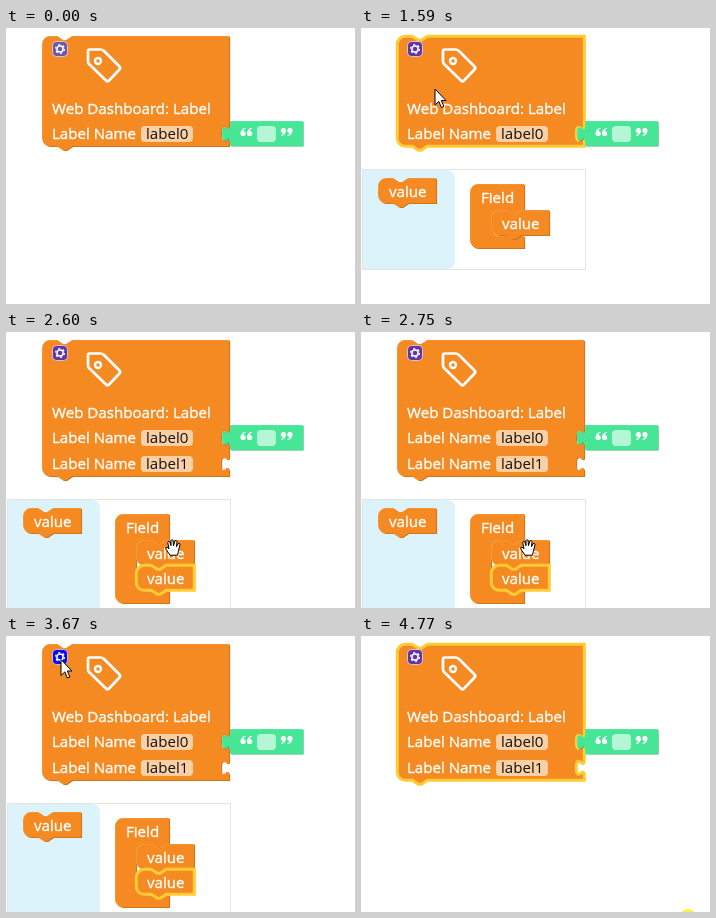
These frames come from a looping animation (349 by 276 pixels, 4.85 s). An HTML page:

```html
<!DOCTYPE html>
<html lang="en">
<head>
<meta charset="utf-8">
<title>Adding a label row</title>
<style>
  html, body { margin: 0; width: 100%; height: 100%; overflow: hidden; background: #fff; }
  svg { display: block; width: 349px; height: 276px; }
  text { font: 15.1px "Open Sans", "Noto Sans", sans-serif; fill: #fff; stroke: #fff; stroke-width: .35; }
  .field { fill: #111; stroke: none; }
  .selected .edge { display: none; }
  .selected > .face { stroke: #fc3; stroke-width: 3; }
  .dragging .face { fill-opacity: .8; stroke-opacity: .75; }
  .dragging text { opacity: .85; }
</style>
</head>
<body>
<svg id="stage" viewBox="0 0 349 276"></svg>
<script>
const LOOP = 4850;
const ORANGE = ['#f58a22', '#c36e1b', '#f9b066'];
const GREEN = ['#47e697', '#39b879', '#7eeeb6'];

// Block outlines, relative to each block's top left corner
const NOTCH = 'l6 4h3l6-4', BUMP = 'l-6 4h-3l-6-4';
const SOCKET = 'v5c0 10-8-8-8 7.5s8-2.5 8 7.5';
const top_ = w => `M0 8a8 8 0 0 1 8-8h7${NOTCH}H${w}`;
const bottom = h => `V${h}H30${BUMP}H8a8 8 0 0 1-8-8z`;
const labelPath = rows => top_(187) + 'v85' + Array(rows).fill(SOCKET).join('v6') + bottom(84 + 26 * rows);
const valuePath = top_(58) + bottom(25);
const fieldPath = n => `M0 8a8 8 0 0 1 8-8H54V26H51${BUMP}H29a8 8 0 0 0-8 8V${19 + 25 * n}` +
  `a8 8 0 0 0 8 8H54V${39 + 25 * n}H8a8 8 0 0 1-8-8z`;
const textBlockPath = 'M0 0H72.5V24.5H0V20c0-10-8 8-8-7.5s8 2.5 8-7.5z';

const text = (x, y, s, cls = '') => `<text x="${x}" y="${y}" class="${cls}">${s}</text>`;
const group = (id, x, y, body) => `<g id="${id}" transform="translate(${x} ${y})">${body}</g>`;
const block = (id, x, y, d, [face, dark, light], body = '') => group(id, x, y,
  `<path class="edge" d="${d}" fill="${dark}" transform="translate(.1 .1)"/>
   <path class="edge" d="${d}" fill="${light}" transform="translate(-1 -1)"/>
   <path class="face" d="${d}" fill="${face}" transform="translate(-.7 -.7)"/>${body}`);
const value = (id, x, y) => block(id, x, y, valuePath, ORANGE, text(10, 18, 'value'));
const row = i => text(9, 102 + 26 * i, 'Label Name') +
  `<rect x="98" y="${89 + 26 * i}" width="52" height="16" rx="4" fill="#fbd0a5"/>` +
  text(103, 102 + 26 * i, 'label' + i, 'field');

const tag = `<g fill="none" stroke="#fff" stroke-width="2.700" stroke-linejoin="round" transform="translate(-.5 -.5)">
  <path d="M47 13H58Q60 13 61.500 14.500L77 30Q78.500 31.500 77 33L66.500 44Q65 45.500 63.500 44L47 28Q45.500 26.500 45.500 25V15Q45.500 13 47 13z"/>
  <circle cx="55.500" cy="24.500" r="3" stroke-width="2.400"/></g>`;
const labelBlock = rows => block('label' + rows, 37, 9, labelPath(rows), ORANGE,
  tag + text(9, 77, 'Web Dashboard: Label') + row(0) + (rows > 1 ? row(1) : ''));

const gear = `<rect id="gearBox" x="-7.500" y="-7.500" width="15" height="15" rx="4" stroke="#fff" stroke-opacity=".6"/>
  <circle r="3.100" fill="none" stroke="#fff" stroke-width="1.500"/>
  <circle r="4.400" fill="none" stroke="#fff" stroke-width="1.300" stroke-dasharray="2 2.608"/>`;
const mark = `M5 1C2 1 0 4 0 6.500a2.600 2.600 0 1 0 2.600-2.600Q3.200 2.300 5 1.800z
  M11.500 1C8.500 1 6.500 4 6.500 6.500a2.600 2.600 0 1 0 2.600-2.600Q9.700 2.300 11.500 1.800z`;
const quotes = `<path fill="#fff" d="${mark}" transform="translate(9.500 5)"/>
  <path fill="#fff" d="${mark}" transform="translate(61.500 15) rotate(180)"/>`;
const pill = '<rect x="26" y="4" width="19" height="16" rx="4" fill="#b5f6d6"/>';

const field = n => block('field' + n, 110, 157, fieldPath(n), ORANGE, text(10, 18, 'Field'));
const bubble = group('bubble', 0, 0,
  `<rect id="frame" x="1.500" y="141.500" width="223" height="100" fill="#fff" stroke="#e4e4e4"/>
   <path id="tray" fill="#ddf3fc"/>` +
  value('source', 18, 151) + field(1) + field(2) + value('first', 131, 183) + value('second', 131, 208));

const line = 'stroke="#000" stroke-linejoin="round"';
const cursors = `<g id="hand"><path transform="translate(-8 -9.300)" fill="#fff" ${line}
    d="M5 16.500L1 10.500Q0 8.500 2 8.500L4 10 2.800 4Q3 2 4.800 3L6 7V2Q6.500.300 8 1.500L8.500 7 10 2Q11.500 1 12 3L11.500 8 13 5Q15 4 15 6L13.500 12 12.500 16.500z"/></g>
  <g id="fist"><path fill="#fff59a" stroke="#8a6a00" stroke-width=".8" stroke-dasharray="1.500 1"
    d="M-3 6L-6 1Q-6-1-4-1V-3Q-3-5-1-4 1-6 2-4 4-5 5-3 7-3 6 0L4 6z"/></g>
  <g id="arrow"><path fill="#fff" ${line} d="M0 0V16L3.800 12.400 6.400 18.500 8.900 17.500 6.300 11.500H11z"/></g>`;

document.getElementById('stage').innerHTML = labelBlock(1) + labelBlock(2) +
  group('gear', 54, 21, gear) +
  block('quoted', 225, 94, textBlockPath, GREEN, quotes + pill) +
  bubble + value('dragged', 0, 0) +
  '<circle id="halo" r="8" fill="#fff02e" fill-opacity=".9"/>' + cursors;

const $ = Object.fromEntries([...document.querySelectorAll('[id]')].map(el => [el.id, el]));
const show = (el, on) => el.style.display = on ? '' : 'none';
const place = (el, x, y) => el.setAttribute('transform', `translate(${x} ${y})`);
const within = (t, a, b) => t >= a && t < b;

// Pointer moves: start, end, number of steps, kind, evenly timed waypoints
const moves = [
  [580, 960, 6, 'hand', [[214, 193], [150, 100], [67, 23]]],
  [1040, 1190, 3, 'arrow', [[56, 20]]],
  [1270, 1590, 5, 'arrow', [[57, 22], [64, 38], [74, 61]]],
  [1660, 1900, 4, 'arrow', [[73, 70], [62, 138]]],
  [1980, 2060, 2, 'hand', [[58, 155], [57, 162]]],
  [2140, 2140, 1, 'fist', [[57, 162]]],
  [2210, 2430, 4, 'fist', [[127, 200], [167, 216]]],
  [2600, 2750, 3, 'hand', [[167, 216]]],
  [2830, 3070, 4, 'hand', [[155, 195], [72, 86]]],
  [3130, 3610, 7, 'hand', [[68, 82], [41, 58], [58, 33]]],
  [3670, 3880, 3, 'arrow', [[55, 23.5]]],
  [3950, 4140, 4, 'hand', [[62, 34], [141, 106]]],
  [4230, 4300, 2, 'hand', [[225, 180], [315, 267]]],
  [4370, 4370, 1, 'none', [[327, 281]]]
];

function pointer(t) {
  const move = moves.findLast(m => t >= m[0]);
  if (!move) return { kind: 'none', x: 0, y: 0 };
  const [start, end, steps, kind, points] = move;
  if (steps === 1 || points.length === 1) return { kind, x: points[0][0], y: points[0][1] };
  const last = steps - 1;
  const i = Math.min(last, Math.floor((t - start) / (end - start) * last + .1));
  const p = i / last * (points.length - 1);
  const k = Math.min(points.length - 2, Math.floor(p));
  const mix = axis => points[k][axis] + (points[k + 1][axis] - points[k][axis]) * (p - k);
  return { kind, x: mix(0), y: mix(1) };
}

function render(t) {
  const grown = t >= 2600;
  const dragging = within(t, 2140, 2600);
  const { kind, x, y } = pointer(t);

  show($.label1, !grown);
  show($.label2, grown);
  for (const el of [$.label1, $.label2])
    el.classList.toggle('selected', within(t, 1110, 2210) || t >= 3800);

  const hovered = within(t, 1040, 1340) || within(t, 3670, 3950);
  $.gearBox.setAttribute('fill', hovered ? '#0808f4' : t < 1040 ? '#6b58a8' : '#6236a5');

  show($.bubble, within(t, 1190, 3880));
  place($.bubble, 0, grown ? 26 : 0);
  const height = grown ? 125 : 100;
  $.frame.setAttribute('height', height);
  $.tray.setAttribute('d', `M2 142H86a8 8 0 0 1 8 8V${133 + height}a8 8 0 0 1-8 8H2z`);
  show($.field1, !grown);
  show($.field2, grown);
  show($.second, grown);

  show($.dragged, dragging);
  place($.dragged, x - 39, y - 11);

  for (const name of ['hand', 'fist', 'arrow']) {
    show($[name], kind === name);
    place($[name], x, y);
  }
  show($.halo, dragging || within(t, 1110, 1190) || within(t, 3800, 3880) || t >= 4770);
  place($.halo, x, y);
}

$.second.classList.add('selected');
$.dragged.classList.add('selected', 'dragging');

const start = performance.now();
function tick() {
  render((performance.now() - start) % LOOP);
  requestAnimationFrame(tick);
}
render(0);
requestAnimationFrame(tick);
</script>
</body>
</html>
```
